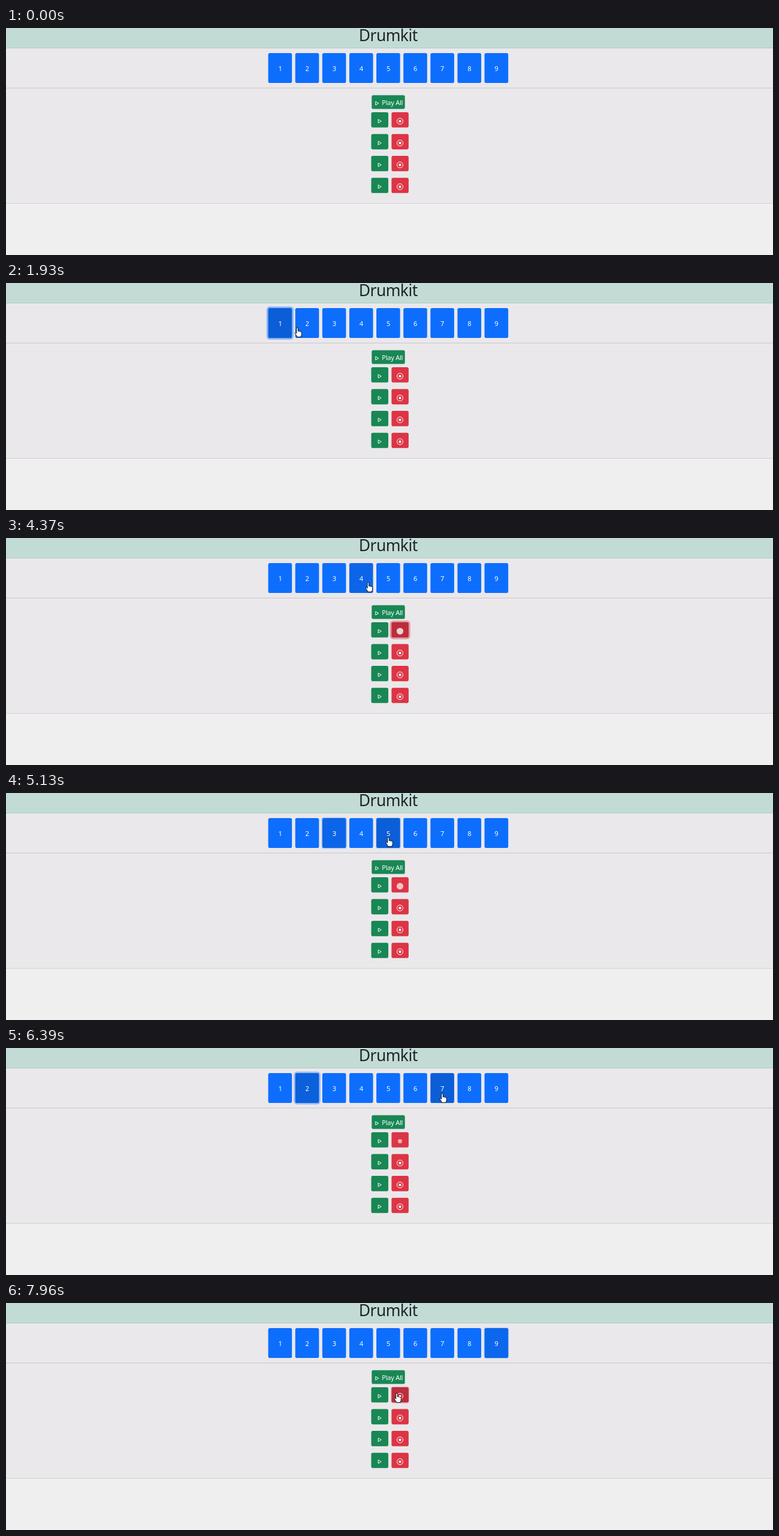
An HTML page that plays this animation: 1280x380 px, repeating every 8 s.

```html
<!DOCTYPE html>
<html lang="en">
<head>
<meta charset="utf-8">
<title>Drumkit</title>
<style>
  html, body { margin: 0; width: 100%; height: 100%; overflow: hidden; background: #efefef; }
  svg { display: block; font-family: "Segoe UI", "Open Sans", "Noto Sans", sans-serif; }
</style>
</head>
<body>
<svg id="stage" width="1280" height="380" viewBox="0 0 1280 380">
  <rect width="1280" height="293" fill="#eae8eb"/>
  <rect width="1280" height="33" fill="#c2dcd5"/>
  <rect y="33" width="1280" height="1" fill="#a9cbc0"/>
  <rect y="100" width="1280" height="1" fill="#c9c8ca"/>
  <rect y="293" width="1280" height="1" fill="#d0d0d0"/>
  <text x="588.8" y="22.3" font-size="26.5" letter-spacing="-.6" fill="#212529">Drumkit</text>
</svg>
<script>
const LOOP = 8000, ENTER = 300, STEP = 78;
const FADE = 150, RING = 2.8, RECORD = 11, PULSE = 750;
const stage = document.getElementById('stage');

function set(el, attrs) {
  for (const k in attrs) el.setAttribute(k, attrs[k]);
}
function add(tag, attrs, text = '') {
  const el = document.createElementNS('http://www.w3.org/2000/svg', tag);
  set(el, attrs);
  el.textContent = text;
  return stage.appendChild(el);
}

const BLUE = { base: [13, 110, 253], dark: [11, 94, 215], ring: 'rgb(49,132,253)' };
const GREEN = { base: [25, 135, 84], dark: [21, 115, 71], ring: 'rgb(60,153,110)' };
const RED = { base: [220, 53, 69], dark: [187, 45, 59], ring: 'rgb(225,83,97)' };

const buttons = [];
function button(x, y, w, h, color) {
  const ring = add('rect', { fill: color.ring });
  const face = add('rect', { x, y, width: w, height: h, rx: 2.8 });
  buttons.push({ x, y, w, h, color, ring, face });
}
function triangle(x, y) {
  add('path', { d: `M${x} ${y - 3}l5 3-5 3z`, fill: 'none', stroke: '#fff', 'stroke-linejoin': 'round' });
}
function target(y) {
  return [
    add('circle', { cx: 657.5, cy: y, r: 5, fill: 'none', stroke: '#fff' }),
    add('circle', { cx: 657.5, cy: y, r: 2.1, fill: '#fff' })
  ];
}

for (let i = 0; i < 9; i++) {
  const x = 437.6 + 45.12 * i;
  button(x, 42, 39.6, 50, BLUE);
  add('text', { x: x + 20, y: 72, 'font-size': 11.2, 'text-anchor': 'middle', fill: '#fff' }, i + 1);
}
button(610.3, 112.5, 55.4, 23, GREEN);
triangle(616.8, 126);
add('text', { x: 627.3, y: 129, 'font-size': 10.9, 'letter-spacing': -.2, fill: '#fff' }, 'Play All');

const targets = [];
for (let i = 0; i < 4; i++) {
  const y = 141 + 36.55 * i;
  button(609.5, y, 28.5, 25.6, GREEN);
  triangle(621.2, y + 15);
  button(643.4, y, 28.5, 25.6, RED);
  targets.push(target(y + 15));
}
const pulse = add('circle', { cx: 657.5, cy: 156, fill: '#fff' });
const pointer = add('path', { fill: '#fff', stroke: '#000', 'stroke-width': .9, 'stroke-linejoin': 'round' });
const HAND = 'M-1.3 9.6V1.2a1.3 1.3 0 0 1 2.6 0V6q1.2-.8 2.2 .3q1.2-.6 2 .5q1.8-.3 1.8 1.4V11q0 2-1.2 3.2V15.5H-.6V14.5L-3.8 10q-.8-1.6 .4-2q.9-.2 2.1 1.6z';
const ARROW = 'M0 0V14l3.3-3 2.2 5 2-.9-2.2-4.9H10z';

// Where the pointer rests: arrival, departure, x, y
const stops = [
  [ENTER, ENTER, 1168, 358], [530, 680, 560, 8], [1250, 1650, 461, 76], [2150, 2380, 502, 74],
  [2560, 3050, 544, 78], [3600, 4000, 654, 158], [4375, 4400, 604, 74], [4540, 4800, 551, 76],
  [5000, 5250, 638, 74], [5560, 5980, 501, 72], [6290, 6540, 728, 76], [6850, 7220, 821, 73],
  [7700, 8050, 652, 151]
];

const smooth = u => u * u * (3 - 2 * u);

function pointerAt(t) {
  const i = stops.findLastIndex(s => s[0] <= t);
  if (i < 0) return null;
  const [, leave, x, y] = stops[i];
  if (t <= leave) return { x, y };
  const [arrive, , nextX, nextY] = stops[i + 1];
  const u = smooth((t - leave) / (arrive - leave));
  return { x: x + (nextX - x) * u, y: y + (nextY - y) * u };
}
function hoverAt(t) {
  const p = pointerAt(t);
  return p ? buttons.findIndex(b => p.x >= b.x && p.x <= b.x + b.w && p.y >= b.y && p.y <= b.y + b.h) : -1;
}

// Every longer rest clicks the button shortly before moving on
const clicks = stops
  .filter(([arrive, leave]) => leave - arrive > 200)
  .map(([, leave]) => ({ time: leave - 180, button: hoverAt(leave) }));
const [recordOn, recordOff] = clicks.filter(c => c.button === RECORD).map(c => c.time);
const pulseStart = recordOn + STEP;

const focusAt = t => clicks.findLast(c => c.time <= t)?.button ?? -1;

function draw(t) {
  // Averaging the recent states gives each button its fade
  const recent = Array.from({ length: 15 }, (_, k) => {
    const s = t - k * FADE / 15;
    return { hover: hoverAt(s), focus: focusAt(s) };
  });
  const level = test => smooth(recent.filter(test).length / recent.length);

  buttons.forEach((b, i) => {
    const dark = level(s => s.hover === i || s.focus === i);
    const glow = level(s => s.focus === i);
    const r = RING * glow;
    const rgb = b.color.base.map((c, k) => Math.round(c + (b.color.dark[k] - c) * dark));
    set(b.face, { fill: `rgb(${rgb})` });
    set(b.ring, {
      x: b.x - r, y: b.y - r, width: b.w + 2 * r, height: b.h + 2 * r,
      rx: 2.8 + r, opacity: glow / 2
    });
  });

  // The disc grows in during the first half, then fades at full size
  const recording = t >= pulseStart && t < recordOff;
  const phase = (t - pulseStart) / PULSE % 1;
  targets[0].forEach(el => set(el, { opacity: recording ? 0 : 1 }));
  set(pulse, recording
    ? { r: 5.6 * Math.min(1, phase * 2), opacity: 1 - Math.abs(phase * 2 - 1) }
    : { r: 0, opacity: 0 });

  const p = pointerAt(t);
  set(pointer, p
    ? { d: hoverAt(t) < 0 ? ARROW : HAND, transform: `translate(${p.x} ${p.y})`, opacity: 1 }
    : { opacity: 0 });
}

// The picture refreshes in even steps
const snap = t => ENTER + STEP * Math.floor((t - ENTER) / STEP + .3);

const start = performance.now();
function tick() {
  draw(snap((performance.now() - start) % LOOP));
  requestAnimationFrame(tick);
}
tick();
</script>
</body>
</html>
```
